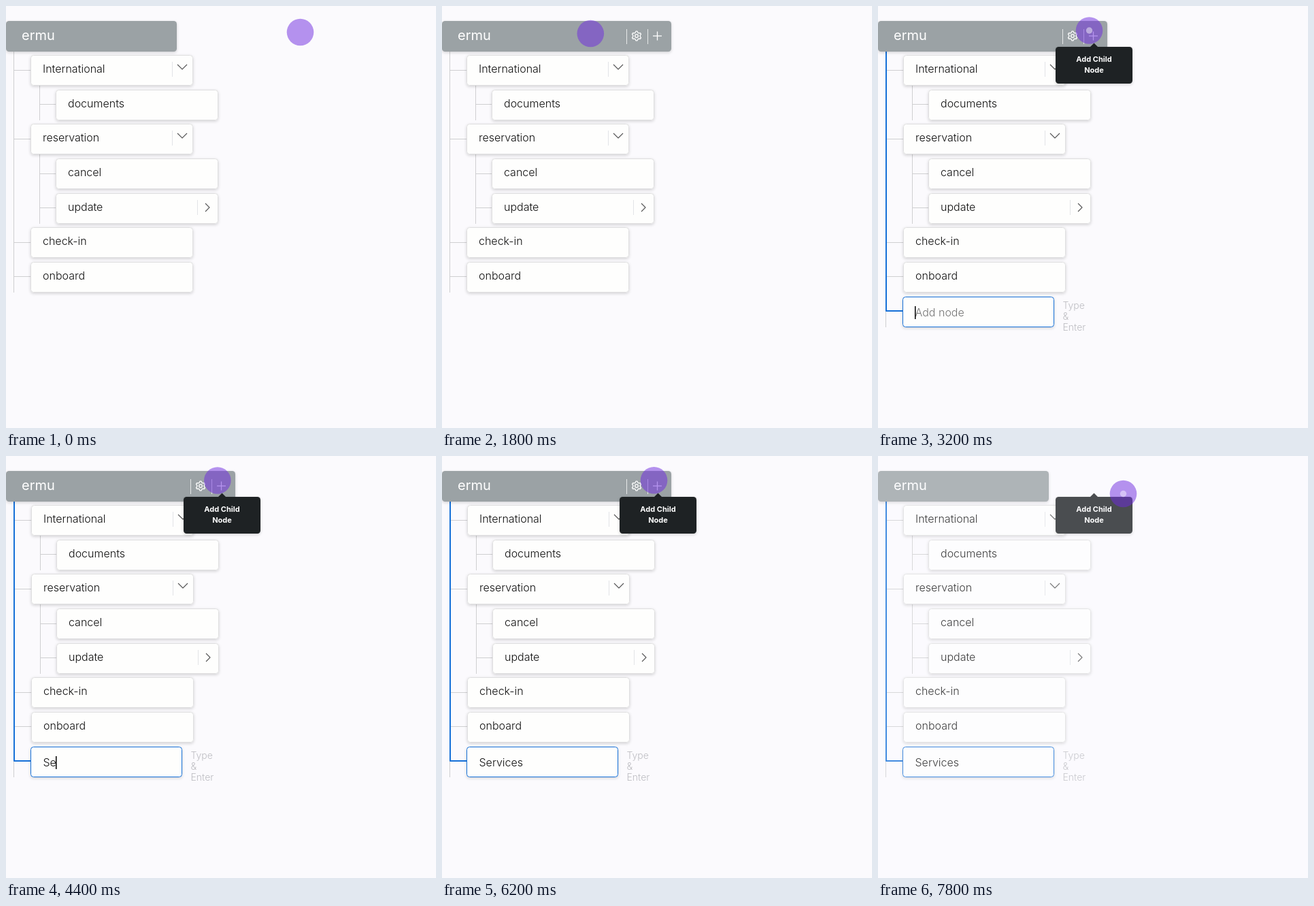
An HTML page with a canvas that plays this animation: 632 px wide and 620 px high, repeating every 8000 ms.

```html
<!DOCTYPE html>
<html lang="en">
<head>
<meta charset="utf-8">
<title>Tree editor</title>
<style>
html, body { margin: 0; width: 100%; height: 100%; overflow: hidden; background: #fbfafd; }
canvas { display: block; }
</style>
</head>
<body>
<canvas id="stage" width="632" height="620"></canvas>
<script>
const ctx = document.getElementById('stage').getContext('2d');
const LOOP = 8000, STEP = 200;
const BG = '#fbfafd', GREY = '#cfcfd1', BLUE = '#1570d8', DARK = '#1e2224';
const FONT = 'Inter, "Open Sans", sans-serif';

// label, depth, top, chevron
const NODES = [
  ['International', 0, 72, 'down'],
  ['documents', 1, 123, ''],
  ['reservation', 0, 173, 'down'],
  ['cancel', 1, 224, ''],
  ['update', 1, 275, 'right'],
  ['check-in', 0, 325, ''],
  ['onboard', 0, 376, '']
];

// time, x, y
const PATH = [
  [0, 432.5, 38.5], [1200, 205, 40], [1600, 205, 40], [1800, 218.3, 40.5],
  [2000, 284, 38], [2200, 307.5, 36.8], [2600, 310.5, 36], [4000, 310.5, 36],
  [5200, 311.5, 35.8], [7200, 311.5, 35.8], [7400, 313.5, 35.8],
  [7600, 331, 42], [7800, 360.5, 55.5], [8000, 360.5, 55.5]
];

function cursorAt(t) {
  let i = 0;
  while (i < PATH.length - 2 && t >= PATH[i + 1][0]) i++;
  const [t0, x0, y0] = PATH[i], [t1, x1, y1] = PATH[i + 1];
  let u = (t - t0) / (t1 - t0);
  if (i === 0) u = 1 - (1 - u) ** 2;
  return [x0 + (x1 - x0) * u, y0 + (y1 - y0) * u];
}

function line(color, width, ...pts) {
  ctx.strokeStyle = color;
  ctx.lineWidth = width;
  ctx.beginPath();
  for (let i = 0; i < pts.length; i += 2) ctx.lineTo(pts[i], pts[i + 1]);
  ctx.stroke();
}

function text(str, x, y, size, weight, color, align = 'left') {
  ctx.font = `${weight} ${size}px ${FONT}`;
  ctx.fillStyle = color;
  ctx.textAlign = align;
  ctx.fillText(str, x, y);
}

function box(x, y, w, h, fill, border) {
  ctx.save();
  ctx.shadowColor = 'rgba(0,0,0,.17)';
  ctx.shadowBlur = 4;
  ctx.shadowOffsetY = 1.5;
  ctx.fillStyle = fill;
  ctx.beginPath();
  ctx.roundRect(x, y, w, h, 4.5);
  ctx.fill();
  ctx.restore();
  if (!border) return;
  ctx.strokeStyle = border;
  ctx.lineWidth = 1;
  ctx.beginPath();
  ctx.roundRect(x + .5, y + .5, w - 1, h - 1, 4);
  ctx.stroke();
}

function disc(x, y, r, color) {
  ctx.fillStyle = color;
  ctx.beginPath();
  ctx.arc(x, y, r, 0, Math.PI * 2);
  ctx.fill();
}

function gear(x, y) {
  ctx.strokeStyle = '#fff';
  ctx.lineWidth = 1.3;
  ctx.lineJoin = 'round';
  ctx.beginPath();
  for (let i = 0; i < 24; i++) {
    const a = (i - .5) * Math.PI / 12 - Math.PI / 2;
    const r = i % 4 < 2 ? 7 : 5.2;
    ctx.lineTo(x + r * Math.cos(a), y + r * Math.sin(a));
  }
  ctx.closePath();
  ctx.stroke();
  ctx.beginPath();
  ctx.arc(x, y, 2.3, 0, Math.PI * 2);
  ctx.stroke();
}

function header(open) {
  box(0, 22, open ? 337 : 251, 45, '#9ba2a5');
  text('ermu', 23, 50, 20, 400, '#fff');
  if (!open) return;
  for (const x of [271.5, 302.5]) line('rgba(255,255,255,.75)', 1, x, 34, x, 56);
  gear(286, 44);
  line('#fff', 1.3, 310, 44, 323, 44);
  line('#fff', 1.3, 316.5, 37.5, 316.5, 50.5);
}

function connectors(adding) {
  const sub = adding ? 50.5 : 49.5;
  line(GREY, 1, 11.5, 67, 11.5, adding ? 472 : 421);
  line(GREY, 1, sub, 117, sub, 168);
  line(GREY, 1, sub, 218, sub, 320);
  for (const y of [94.5, 195.5, 347.5, 397.5]) line(GREY, 1, 12, y, 37, y);
  for (const y of [144.5, 246.5, 296.5]) line(GREY, 1, sub, y, 74, y);
  if (adding) line(BLUE, 2, 12, 67, 12, 448, 37, 448);
}

function node([label, depth, top, chevron], shift) {
  const x = 36 + depth * 37 + shift;
  box(x, top, 239, 45, '#fefefd', '#dfdfe0');
  text(label, x + 18, top + 26, 16, 300, '#111');
  if (!chevron) return;
  line('#e2e4e7', 1, x + 208.5, top + 10, x + 208.5, top + 32);
  const cx = x + 223, cy = top + 18;
  if (chevron === 'down') line('#555', 1.1, cx - 7, cy - 4, cx, cy + 3, cx + 7, cy - 4);
  else line('#555', 1.1, cx - 3, cy - 3, cx + 3, cy + 3, cx - 3, cy + 9);
}

function caretOn(t) {
  if (t < 4200) return t < 3400 || t >= 3800;
  return t < 6200 || (t >= 6800 && t < 7400);
}

function input(t) {
  const count = t >= 5800 ? 8 : Math.min(7, Math.max(0, Math.floor((t - 4000) / 200)));
  const typed = 'Services'.slice(0, count);
  box(36, 427, 223, 45, '#fefefd', BLUE);
  text(typed || 'Add node', 54.5, 456, 16, 300, typed ? '#111' : '#757575');
  if (caretOn(t)) {
    const x = 54 + Math.round(ctx.measureText(typed).width);
    ctx.fillStyle = '#000';
    ctx.fillRect(x, 441, 1.5, 19);
  }
  ['Type', '&', 'Enter'].forEach((s, i) => text(s, 271.5, 445 + i * 16, 14, 300, '#bdbdc2'));
}

function tooltip(cx, h, lines) {
  box(cx - 56.5, 60, 113, h, DARK);
  ctx.fillStyle = DARK;
  ctx.beginPath();
  ctx.moveTo(cx - 6, 60.5);
  ctx.lineTo(cx, 54.5);
  ctx.lineTo(cx + 6, 60.5);
  ctx.fill();
  lines.forEach((s, i) => text(s, cx, 82 + i * 16, 11, 700, '#fff', 'center'));
}

function draw(t) {
  const adding = t >= 2800, leaving = t >= 7800;
  ctx.fillStyle = BG;
  ctx.fillRect(0, 0, 632, 620);
  connectors(adding);
  header(t >= 800 && !leaving);
  for (const n of NODES) node(n, adding ? 1 : 0);
  if (adding) input(t);
  if (t >= 2200) tooltip(317.5, 54, ['Add Child', 'Node']);
  if (t >= 2000 && t < 2400) tooltip(287, 38, ['Settings']);
  if (leaving) {
    ctx.globalAlpha = .2;
    ctx.fillStyle = BG;
    ctx.fillRect(0, 0, 632, 620);
    ctx.globalAlpha = 1;
  }
  const [x, y] = cursorAt(t);
  disc(x, y, 19.8, 'rgba(110,42,224,.5)');
  if ((t >= 2800 && t < 3400) || leaving) disc(x, y, 4.7, 'rgba(255,255,255,.45)');
}

function tick() {
  draw(Math.floor(performance.now() % LOOP / STEP) * STEP);
  requestAnimationFrame(tick);
}
tick();
</script>
</body>
</html>
```
